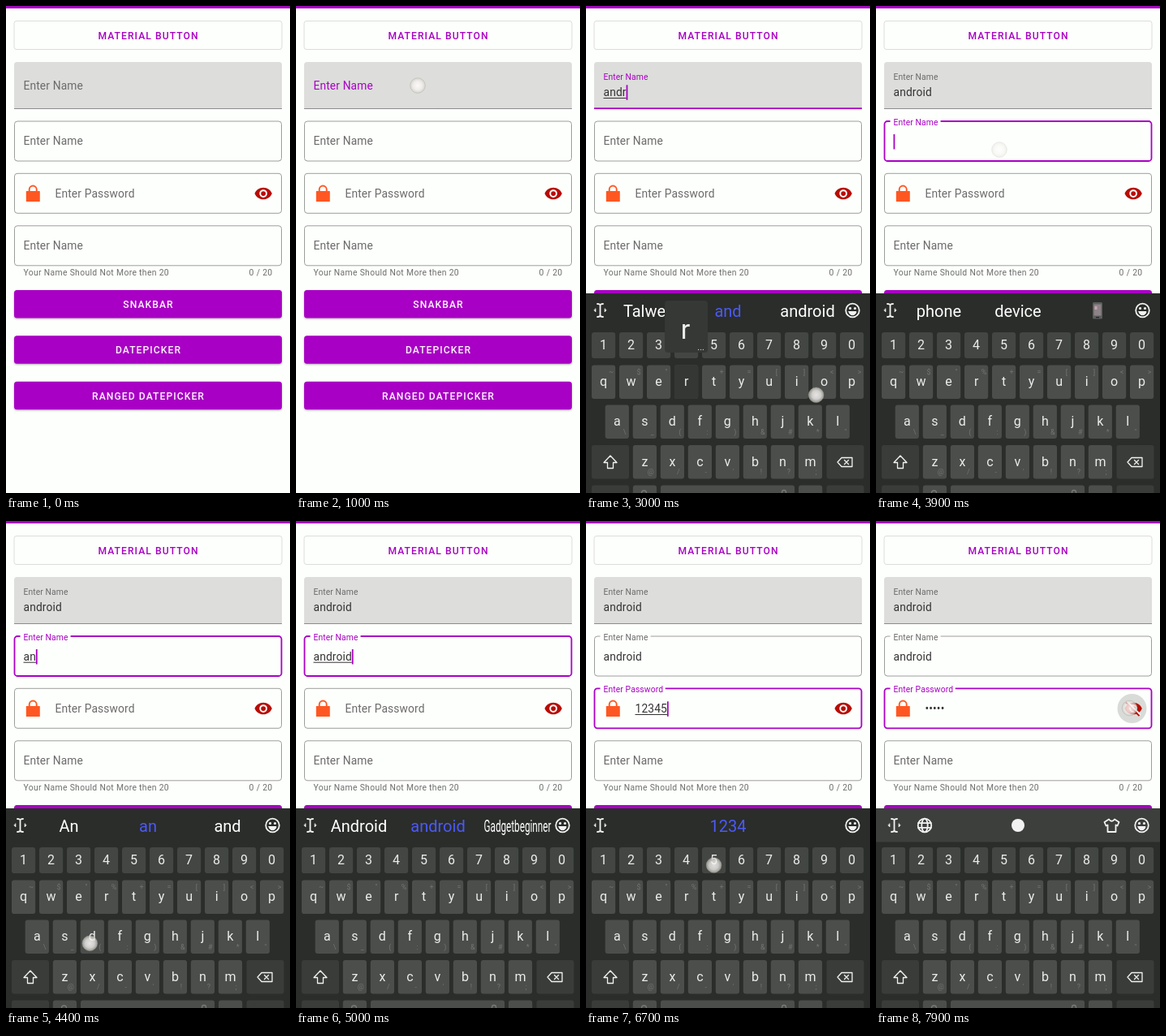
These frames come from a looping animation (350 px wide and 600 px high, 8000 ms). An HTML page:

```html
<!DOCTYPE html>
<html lang="en">
<head>
<meta charset="utf-8">
<title>Material form</title>
<style>
  html, body { margin: 0; width: 100%; height: 100%; overflow: hidden; background: #fdfffc; }
  svg { display: block; width: 350px; height: 600px; font-family: Roboto, sans-serif; }
  .btn { font-size: 12.1px; font-weight: 500; letter-spacing: 1.08px; text-anchor: middle; }
  .input { font-size: 13.8px; letter-spacing: .13px; white-space: pre; }
  .help { font-size: 10.35px; letter-spacing: .345px; fill: #6c6d6c; }
  .key { font-size: 16px; fill: #ececec; text-anchor: middle; }
  .hint { font-size: 9px; fill: #727472; text-anchor: middle; }
  .sug { font-size: 20px; text-anchor: middle; }
  .icon { fill: none; stroke: #f2f2f2; stroke-width: 1.8; stroke-linejoin: round; stroke-linecap: round; }
</style>
</head>
<body>
<svg viewBox="0 0 350 600">
  <defs>
    <filter id="shadow" x="-5%" y="-20%" width="110%" height="150%">
      <feDropShadow dx="0" dy="1" stdDeviation="1" flood-opacity=".3"/>
    </filter>
    <radialGradient id="dot">
      <stop offset="0" stop-color="#fff" stop-opacity=".85"/>
      <stop offset=".6" stop-color="#f4f0ee" stop-opacity=".8"/>
      <stop offset="1" stop-color="#d4d4cc" stop-opacity=".6"/>
    </radialGradient>
  </defs>
  <g id="page"></g>
  <g id="fields"></g>
  <g id="keyboard"><g id="keys"></g><g id="bar"></g></g>
  <g id="touch"></g>
</svg>
<script>
const LOOP = 8000, PURPLE = '#a800c4', BG = '#fdfffc', GREY = '#6b6b6b', INK = '#343434';
const el = id => document.getElementById(id);
const clamp = v => Math.min(1, Math.max(0, v));
const ease = v => { v = clamp(v); return v * v * (3 - 2 * v); };
const mix = (a, b, p) => a + (b - a) * p;
const within = (t, a, b) => t >= a && t < b;

const rect = (x, y, w, h, r, fill, extra = '') =>
  `<rect x="${x}" y="${y}" width="${w}" height="${h}" rx="${r}" fill="${fill}" ${extra}/>`;
const text = (x, y, cls, s, extra = '') => `<text x="${x}" y="${y}" class="${cls}" ${extra}>${s}</text>`;
const esc = s => s.replace(/&/g, '&amp;').replace(/</g, '&lt;');

const pen = document.createElement('canvas').getContext('2d');
const measure = (s, size) => {
  pen.font = `${size}px Roboto, sans-serif`;
  return pen.measureText(s).width;
};

// Static page
function drawPage() {
  const solid = (y, s) => rect(10, y, 330, 34.5, 3.5, PURPLE, 'filter="url(#shadow)"') +
    text(175.5, y + 22, 'btn', s, 'fill="#fdf6ff"');
  el('page').innerHTML =
    rect(0, 0, 350, 600, 0, BG) + rect(0, 0, 350, 3, 0, PURPLE) +
    rect(10, 18.5, 330, 35, 3, 'none', 'stroke="#dcdedb"') +
    text(175.5, 41, 'btn', 'MATERIAL BUTTON', `fill="${PURPLE}"`) +
    text(21.5, 331.5, 'help', 'Your Name Should Not More then 20') +
    text(328.5, 331.5, 'help', '0 / 20', 'text-anchor="end"') +
    solid(350, 'SNAKBAR') + solid(406.3, 'DATEPICKER') + solid(462.7, 'RANGED DATEPICKER');
}

// Keyboard
const KEY = {};
function drawKeyboard() {
  let out = rect(0, 354, 350, 246, 0, '#2a2d2a');
  const row = (chars, hints, x0, y, h, hx, hy) => [...chars].forEach((c, i) => {
    const x = x0 + i * 34, cx = x + 14.6;
    KEY[c] = { x, y, h, cx, cy: y + h / 2 };
    out += rect(x, y, 29.2, h, 3, hints ? '#4b4e4b' : '#434643') +
      text(cx, y + h / 2 + 5.2, 'key', c);
    if (hints) out += text(x + hx, y + hy, 'hint', esc(hints[i]));
  });
  row('1234567890', '', 7, 402, 32);
  row('qwertyuiop', '~$"%+=[]<>', 7, 442.5, 41.5, 24, 11);
  row('asdfghjkl', '\\_(:)&#*"', 23.7, 491.5, 41.5, 24, 36);
  row('zxcvbnm', "@/-'!?;", 57.8, 541, 41.5, 22, 36);
  const dark = '#393c39';
  out += rect(7, 541, 46, 41.5, 3, dark) + rect(296.5, 541, 46, 41.5, 3, dark) +
    rect(7, 590.5, 46, 20, 3, dark) + rect(57.8, 590.5, 29.2, 20, 3, '#4b4e4b') +
    rect(92, 590.5, 165, 20, 3, '#4b4e4b') + rect(262, 590.5, 29.2, 20, 3, '#4b4e4b') +
    rect(296.5, 590.5, 46, 20, 3, dark) +
    `<g class="icon" style="stroke-width:1.3">
      <path d="M30 554l8 8.5h-4.500v7h-7v-7h-4.500z"/>
      <path d="M310 562l5-5.500h13v11h-13zM318.500 559.500l5 5m0-5l-5 5"/>
      <path d="M68.500 600a3 3 0 0 1 6 0M241.500 602v-3a2.500 2.500 0 0 1 5 0v3" stroke="#777a77"/>
    </g>`;
  el('keys').innerHTML = out;
}

const caretIcon = x => `<g class="icon" transform="translate(${x} 375)">
  <path d="M-3.500-8q3.500 0 3.500 2v12q0 2-3.500 2M3.500-8q-3.500 0-3.500 2v12q0 2 3.500 2"/>
  <path d="M-5.500-2v4l-2-2zM5.500-2v4l2-2z" fill="#f2f2f2" stroke-width=".6"/></g>`;
const smiley = x => `<g class="icon" transform="translate(${x} 375)" stroke-width="2">
  <circle r="8.300"/><circle cx="-3" cy="-2.500" r=".7"/><circle cx="3" cy="-2.500" r=".7"/>
  <path d="M-4.500 1.500h9a4.500 4.200 0 0 1-9 0z" fill="#f2f2f2" stroke-width="1"/></g>`;
const toolbar = rect(0, 354, 350, 41.5, 0, '#3c3f3c') + caretIcon(22.5) + smiley(327.5) +
  `<g class="icon"><g transform="translate(60 375)"><circle r="8.300"/><ellipse rx="3.700" ry="8.300"/>
    <path d="M-8-2.800h16M-8 2.800h16"/></g>
  <path transform="translate(290.500 375)" d="M-3.500-7.500L-9-4l2 4.500 2-1V8H5V-.5l2 1L9-4l-5.500-3.500Q0-3-3.500-7.500z"/></g>
  <circle cx="175" cy="375" r="8" fill="#f2f2f2"/>`;

function suggestions(words) {
  const word = (s, x, fill) => {
    const fit = Math.min(1, 83 / measure(s, 20));
    return text(0, 0, 'sug', s, `fill="${fill}" transform="translate(${x} 382.500) scale(${fit} 1)"`);
  };
  const [a, b, c, plain] = words;
  return caretIcon(17.5) + smiley(328.5) + word(a, 77.5, '#fff') +
    word(b, 175, plain ? '#fff' : '#4c59f5') +
    (c === 'phone-icon'
      ? rect(267, 365, 12, 20.5, 1.5, '#5b5e5c') + rect(268.5, 367.5, 9, 14, 0, '#8d8288') +
        rect(269.5, 370, 3, 4, 0, '#c9a3ac') + rect(271, 383, 4, 1.2, 0, '#222')
      : word(c, 273, '#fff'));
}
const NEXT_WORDS = ['phone', 'device', 'phone-icon', true];
function predict(s) {
  if (/\d/.test(s)) return ['', s, ''];
  const left = s === 'and' ? 'Talwen' : s[0].toUpperCase() + s.slice(1);
  return [left, s, s === 'android' ? 'Gadgetbeginner' : s.length < 3 ? 'and' : 'android'];
}

// Timeline: each field has a focus time, a blur time and the moments its keys are touched
const FIELDS = [
  { y: 69, h: 57, x: 21.5, hintY: 103, topY: 90.5, base: 111.3, label: 'Enter Name', filled: true,
    word: 'android', taps: [2590, 2690, 2790, 2890, 2980, 3100, 3220], focus: 1000, blur: 3680 },
  { y: 142, h: 49, x: 21.5, hintY: 171.3, topY: 146.8, base: 172, label: 'Enter Name',
    word: 'android', taps: [4120, 4240, 4360, 4480, 4590, 4700, 4810], focus: 3680, blur: 5600 },
  { y: 206.3, h: 49, x: 60.5, hintY: 235.8, topY: 211, base: 236.3, label: 'Enter Password',
    word: '12345', taps: [6270, 6360, 6450, 6540, 6630], focus: 5600, blur: 9000 },
  { y: 270.8, h: 49, x: 21.5, hintY: 300.3, label: 'Enter Name', word: '', taps: [], focus: 9000, blur: 9000 }
];
const TYPE_LAG = 60, SUGGEST_LAG = 150, MASKED = 7380, BAR_RESET = 7480;
const typed = (f, t, lag) => f.word.slice(0, f.taps.filter(k => t >= k + lag).length);

function drawField(f, t) {
  const on = within(t, f.focus, f.blur), p = ease((t - f.focus) / 170);
  const tint = on ? PURPLE : GREY, line = on ? PURPLE : '#9c9e9c';
  const size = mix(1, .75, p);
  let out = '';
  if (f.filled) {
    out += `<path d="M10 127V72.500q0-3.500 3.500-3.500h323q3.500 0 3.500 3.500V127z" fill="#dddddc"/>` +
      rect(10, 126, 330, 1, 0, '#8c8c8c');
    if (on) out += rect(175 - 165 * p, 125.3, 330 * p, 1.8, 0, PURPLE);
  } else {
    out += rect(10.5, f.y, 329, f.h, 3.5, 'none', `stroke="${line}" stroke-width="${on ? 1.8 : 1}"`);
    const gap = (measure(f.label, 10.35) + 8) * p;
    if (p > 0) out += rect(17.5 + (1 - p) * gap / 2, f.y - 2, gap, 4, 0, BG);
  }
  const lx = mix(f.x, 21.5, p), ly = mix(f.hintY, f.topY || 0, p);
  out += text(0, 0, 'input', f.label, `fill="${tint}" transform="translate(${lx} ${ly}) scale(${size})"`);

  const masked = f.x > 60 && t >= MASKED;
  const value = typed(f, t, TYPE_LAG);
  const shown = masked ? '•'.repeat(value.length) : value;
  const width = measure(shown, 13.8) + shown.length * .13;
  if (shown) out += text(f.x, f.base, 'input', shown, `fill="${INK}"`);
  if (on && shown && !masked) out += rect(f.x, f.base + 1.7, width, 1, 0, INK);
  const blinkOff = within(t, 1800, 2250) || masked;
  if (on && p > .5 && !blinkOff) out += rect(f.x + width, f.base - 14, 1.8, 18.5, 0, PURPLE);
  return out;
}

const EYE = 'M12 4.5C7 4.5 2.730 7.610 1 12c1.730 4.390 6 7.500 11 7.500s9.270-3.110 11-7.500c-1.730-4.390-6-7.500-11-7.500z' +
  'M12 17a5 5 0 1 1 0-10a5 5 0 0 1 0 10zM12 9a3 3 0 1 0 0 6a3 3 0 0 0 0-6z';
function drawIcons(t) {
  const ripple = (a, b) => {
    const r = mix(9, 18, ease((t - a) / 90)), o = clamp((t - a) / 60) * clamp((b - t) / 150);
    return t >= a && o > 0 ? `<circle cx="315.500" cy="231" r="${r}" fill="#d9dbd8" opacity="${o}"/>` : '';
  };
  const strike = ease((t - MASKED + 40) / 180);
  const slash = (dx, color) => `<path d="M${3 + dx} ${4 - dx}l${17 * strike} ${17 * strike}"
    stroke="${color}" stroke-width="2"/>`;
  return `<path d="M28.700 229v-3a4.500 4.500 0 0 1 9 0v3" fill="none" stroke="#ff5722" stroke-width="1.900"/>` +
    rect(24.8, 228, 17, 13, .6, '#ff5722') +
    ripple(7280, 7660) + ripple(7780, 8300) +
    `<g transform="translate(305.500 219.400) scale(.97)"><path d="${EYE}" fill="#b80d05" fill-rule="evenodd"/>` +
    (strike > 0 ? slash(1, '#f6f7f5') + slash(-.4, '#b80d05') : '') + '</g>';
}

function drawBar(t) {
  let bar = toolbar;
  const f = FIELDS.findLast(f => t >= f.focus);
  if (f && t < BAR_RESET) {
    const s = typed(f, t, SUGGEST_LAG);
    if (s) bar = suggestions(predict(s));
    else if (f === FIELDS[1]) bar = suggestions(NEXT_WORDS);
  }
  for (const f of FIELDS) f.taps.forEach((k, i) => {
    const c = f.word[i], key = KEY[c];
    if (/\d/.test(c) || !within(t, k + TYPE_LAG, k + TYPE_LAG + 100)) return;
    bar += rect(key.x, key.y, 29.2, key.h, 3, '#343734') + text(key.cx, key.cy + 5.2, 'key', c) +
      rect(key.cx - 26.5, key.y - 79.5, 53, 64, 4, '#353835') +
      text(key.cx - 1, key.y - 33, 'key', c, 'style="font-size:34px"') +
      text(key.cx + 18, key.y - 18.5, 'key', '...', 'style="font-size:11px"');
  });
  return bar;
}

// Touches: start, length, x, y
const TOUCHES = [[820, 290, 150, 98], [3500, 450, 152, 177], [5430, 450, 150, 231],
  [7200, 300, 313, 231], [7760, 500, 312.5, 230.5]];
function drawTouches(t) {
  let out = '';
  const dot = (a, d, x, y, fade) => {
    if (!within(t, a, a + d)) return;
    const o = clamp((t - a + 20) / 40) * clamp((a + d - t) / fade);
    out += `<circle cx="${x}" cy="${y}" r="9.300" fill="url(#dot)" stroke="#a8aa9c" stroke-opacity=".45" opacity="${o}"/>`;
  };
  TOUCHES.forEach(a => dot(...a, 100));
  for (const f of FIELDS) f.taps.forEach((k, i) => {
    const c = f.word[i], key = KEY[c], digit = /\d/.test(c);
    dot(k, 100, key.cx - (digit ? 0 : c === 'o' ? 10 : 3), key.cy + (digit ? 6 : c === 'o' ? 16 : 8), 30);
  });
  return out;
}

const last = {};
function put(id, html) {
  if (last[id] !== html) el(id).innerHTML = last[id] = html;
}

function render(t) {
  put('fields', FIELDS.map(f => drawField(f, t)).join('') + drawIcons(t));
  put('bar', drawBar(t));
  put('touch', drawTouches(t));
  const rise = 1 - (1 - clamp((t - 1080) / 400)) ** 3;
  el('keyboard').setAttribute('transform', `translate(0 ${246 * (1 - rise)})`);
}

drawPage();
drawKeyboard();
const start = performance.now();
(function tick() {
  render((performance.now() - start) % LOOP);
  requestAnimationFrame(tick);
})();
</script>
</body>
</html>
```
